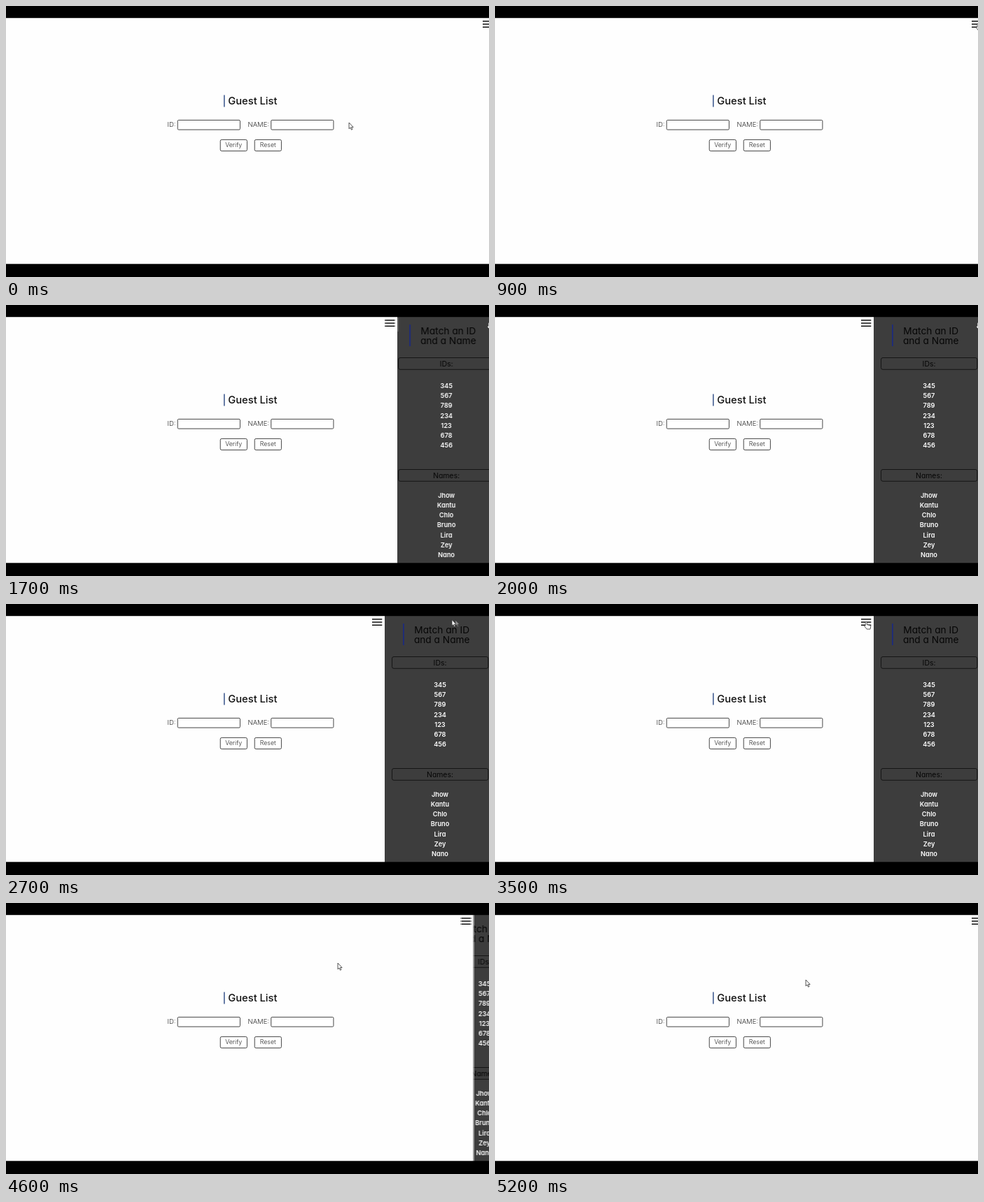
Write an HTML page that moves like this. It is 690 by 388 pixels and loops after 5.3 s.

```html
<!DOCTYPE html>
<html lang="en">
<head>
<meta charset="utf-8">
<title>Guest List</title>
<style>
html, body { margin: 0; width: 100%; height: 100%; overflow: hidden; background: #fff; }
#stage { position: relative; width: 690px; height: 388px; overflow: hidden; background: #fefefe;
  font-family: Inter, Lato, sans-serif; font-feature-settings: "cv11"; }
svg { position: absolute; display: block; overflow: visible; }
.layer { position: absolute; inset: 0; }
.edge { position: absolute; top: 18px; width: 20px; height: 20px; background: #fefefe; }
.panel { position: absolute; top: 17px; height: 353px; right: -9px; overflow: hidden; background: #3d3d3d; }
.panel svg { left: 50%; top: -17px; }
.box { fill: #fff; stroke: #3c3c3c; stroke-width: .95; }
.head { fill: none; stroke: #141414; stroke-width: .95; }
.label { font-size: 9.5px; font-weight: 300; fill: #2a2a2a; }
.button { font-size: 8.8px; font-weight: 300; fill: #2a2a2a; }
.mid { text-anchor: middle; }
.end { text-anchor: end; }
.title { font-size: 13.7px; fill: #060606; }
.group { font-size: 10.4px; fill: #060606; }
.item { font-size: 9.2px; font-weight: 600; fill: #fff; }
.cursor path { fill: #fff; stroke: #2b2b2b; stroke-width: .8; stroke-linejoin: round; }
</style>
</head>
<body>
<div id="stage">
  <svg width="690" height="388">
    <rect x="311" y="127.5" width="1.6" height="17" fill="#435e92"/>
    <text x="317.3" y="141.3" font-size="14.7" font-weight="500" fill="#111">Guest List</text>
    <text class="label end" x="242.5" y="173.4">ID:</text>
    <rect class="box" x="245.2" y="163.4" width="89.2" height="13.7" rx="1.5"/>
    <text class="label end" x="376" y="173.4">NAME:</text>
    <rect class="box" x="378.7" y="163.4" width="89.2" height="13.7" rx="1.5"/>
    <rect class="box" x="306.2" y="191.4" width="38.2" height="16.2" rx="2"/>
    <text class="button mid" x="325.2" y="202.4">Verify</text>
    <rect class="box" x="355.2" y="191.4" width="38.2" height="16.2" rx="2"/>
    <text class="button mid" x="374.2" y="202.4">Reset</text>
  </svg>

  <div class="layer">
    <div class="edge">
      <svg width="14" height="14" style="left:2px;top:2px">
        <path d="M0 1.7H14.3M0 6H14.3M0 10.2H14.3" stroke="#111" stroke-width="1.5"/>
      </svg>
    </div>
    <div class="panel">
      <svg width="1" height="388">
        <rect x="-53" y="28" width="1.8" height="31" fill="#1d2b7c"/>
        <text class="title mid" x="2.7" y="41.8">Match an ID</text>
        <text class="title mid" x="2.7" y="56.3">and a Name</text>
        <g class="lists"></g>
      </svg>
    </div>
  </div>

  <svg class="cursor" width="12" height="12"><path/></svg>
  <svg class="cursor" width="12" height="12" opacity=".4"><path/></svg>
  <svg width="690" height="388">
    <rect width="690" height="17.2"/>
    <rect y="369.3" width="690" height="18.7"/>
  </svg>
</div>
<script>
const LOOP = 5300, STEP = 100;
const CLOSED = 699, OPEN = 541, SLIDE = 880, OPEN_AT = 1171, CLOSE_AT = 4155;
const ARROW = "M0 0V8.8L2 7L3.4 10.2L4.9 9.6L3.5 6.5H6.1Z";
const HAND = "M3.2.5C4.1.5 4.4 1.1 4.4 1.7V4.6L8.4 5.4C9.5 5.7 9.9 6.3 9.7 7.2L9 11H4.2L.8 6.8" +
  "C.3 5.9 1.4 5.3 2.1 6V1.6C2.1.9 2.5.5 3.2.5Z";

// time, x, y of the pointer
const path = [
  [0, 490, 167], [100, 479, 151], [200, 466.5, 128], [300, 500, 103], [400, 556, 88],
  [500, 606, 77], [600, 641.5, 69.5], [700, 662, 50], [800, 679, 32], [900, 686.8, 24.5],
  [2300, 686.8, 24.5], [2400, 683, 25], [2700, 637, 22.5], [2900, 588, 27],
  [3000, 620, 120], [3100, 612, 336], [3200, 430, 300], [3300, 313, 185],
  [3400, 425, 78], [3500, 527, 25], [4200, 527, 25], [4300, 521, 35],
  [4600, 474, 86], [4700, 457, 100], [4900, 449, 107], [5200, 444, 110]
];

const $$ = (sel, root = document) => [...root.querySelectorAll(sel)];

function addList(heading, items, y, first) {
  const rows = items.map((s, i) =>
    `<text class="item mid" x="0" y="${first + i * 14.25}">${s}</text>`);
  $$(".lists")[0].innerHTML +=
    `<rect class="head" x="-68.5" y="${y - 8.5}" width="137.3" height="16.8" rx="2.5"/>` +
    `<text class="group mid" x="0" y="${y + 3.7}">${heading}</text>` + rows.join("");
}
addList("IDs:", [345, 567, 789, 234, 123, 678, 456], 84, 118.9);
addList("Names:", ["Jhow", "Kantu", "Chlo", "Bruno", "Lira", "Zey", "Nano"], 244, 275.6);

const lead = $$(".layer")[0];
const trail = lead.cloneNode(true);
trail.setAttribute("aria-hidden", "true");
lead.after(trail);
const [pointer, echo] = $$(".cursor");

// cubic-bezier(.25, .1, .25, 1)
function ease(p) {
  if (p <= 0) return 0;
  if (p >= 1) return 1;
  const curve = (u, a, b) => 3 * u * (1 - u) ** 2 * a + 3 * u * u * (1 - u) * b + u ** 3;
  let lo = 0, hi = 1;
  for (let i = 0; i < 24; i++) {
    const m = (lo + hi) / 2;
    if (curve(m, .25, .25) < p) lo = m; else hi = m;
  }
  return curve(lo, .1, 1);
}

function panelLeft(t) {
  const span = CLOSED - OPEN;
  return t < CLOSE_AT
    ? CLOSED - span * ease((t - OPEN_AT) / SLIDE)
    : OPEN + span * ease((t - CLOSE_AT) / SLIDE);
}

function pointerAt(t) {
  let i = 1;
  while (i < path.length - 1 && path[i][0] < t) i++;
  const [t0, x0, y0] = path[i - 1], [t1, x1, y1] = path[i];
  const k = Math.min(1, (t - t0) / (t1 - t0));
  return [x0 + (x1 - x0) * k, y0 + (y1 - y0) * k];
}

function placeLayer(layer, x) {
  $$(".edge", layer)[0].style.left = x - 20 + "px";
  $$(".panel", layer)[0].style.width = CLOSED - x + "px";
}

function placePointer(el, t, shape) {
  const [x, y] = pointerAt(t);
  el.style.transform = `translate(${x}px, ${y}px)`;
  el.firstElementChild.setAttribute("d", shape);
}

function draw(t) {
  const closing = t >= CLOSE_AT;
  const lag = closing ? Math.max(12, 32 - (t - 4200) * .05) : 16;
  const x = panelLeft(t), back = panelLeft(closing ? Math.max(CLOSE_AT, t - lag) : t - lag);
  placeLayer(lead, x);
  placeLayer(trail, back);
  trail.style.opacity = Math.abs(x - back) < .3 ? 0 : closing ? .5 : .15;

  const hand = (t >= 900 && t < 2400) || (t >= 3500 && t < 4300);
  placePointer(pointer, t, hand ? HAND : ARROW);
  placePointer(echo, t - 32, ARROW);
  echo.style.visibility = t >= 2500 && t < 3000 ? "visible" : "hidden";
}

const start = performance.now();
function tick() {
  const t = (performance.now() - start) % LOOP;
  draw(Math.floor(t / STEP) * STEP);
  requestAnimationFrame(tick);
}
tick();
</script>
</body>
</html>
```
